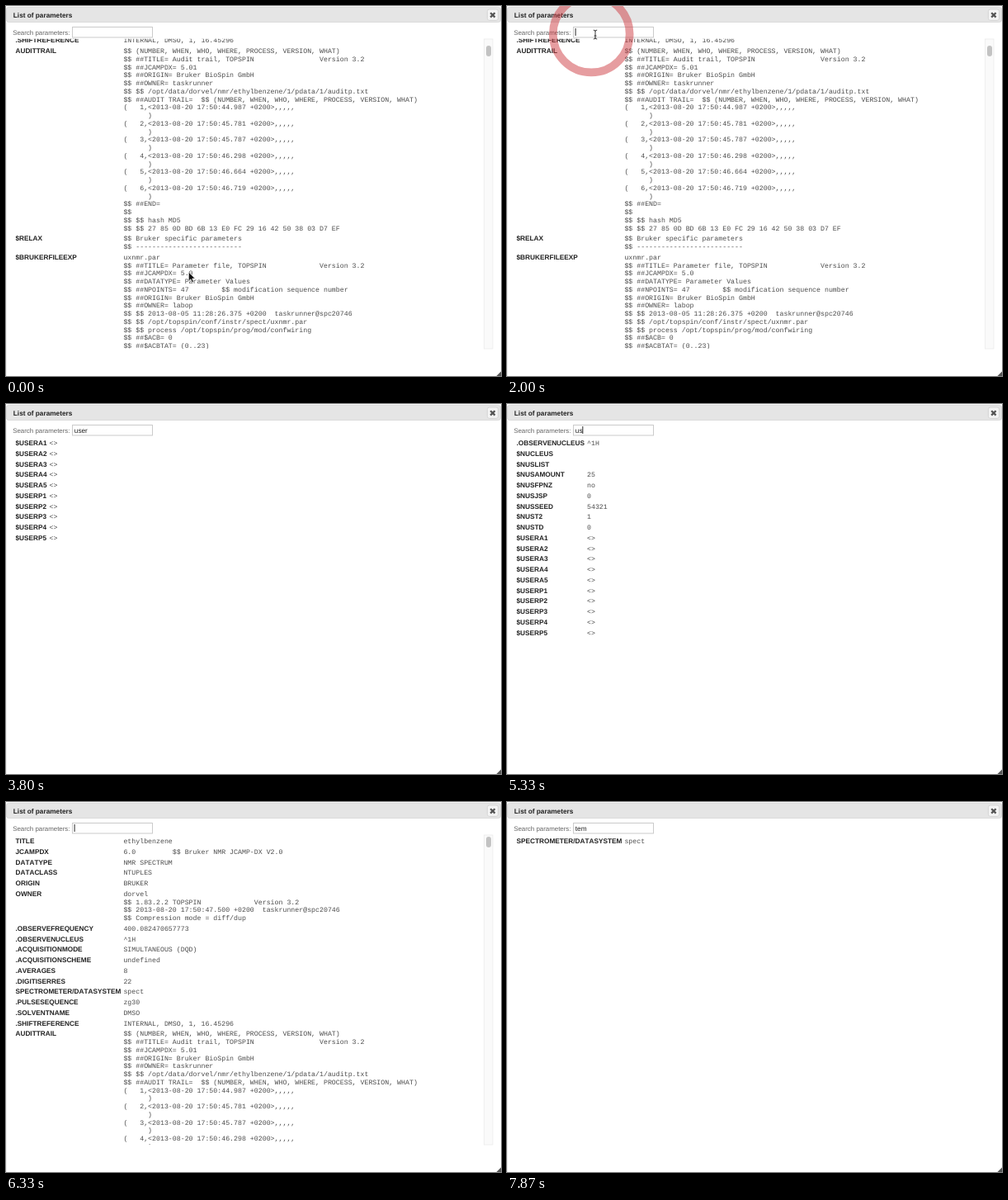
An HTML page that plays this animation: 600x448 px, repeating every 8000 ms.

```html
<!DOCTYPE html>
<html lang="en">
<head>
<meta charset="utf-8">
<title>List of parameters</title>
<style>
html, body { margin: 0; width: 100%; height: 100%; overflow: hidden; background: #fff; }
svg { display: block; }
text { font: 8.25px "Liberation Sans", Arial, sans-serif; font-kerning: none; text-rendering: geometricPrecision; white-space: pre; }
.label { font-weight: bold; fill: #222; }
.value { font-family: "Liberation Mono", "Courier New", monospace; fill: #4c4c4c; }
</style>
</head>
<body>
<svg width="600" height="448" viewBox="0 0 600 448">
  <defs>
    <clipPath id="view"><rect y="39.8" width="600" height="375.2"/></clipPath>
  </defs>
  <rect width="600" height="448" fill="#fff"/>
  <path d="M.5 20V448" stroke="#f0f0f0"/>
  <rect x=".4" y="1.4" width="599.2" height="18.2" rx="3" fill="#e5e5e5" stroke="#d3d3d3" stroke-width=".8"/>
  <text class="label" x="8.8" y="14">List of parameters</text>
  <rect x="583.4" y="4" width="13.2" height="13.4" rx="2.5" fill="#f4f4f4" stroke="#d0d0d0" stroke-width=".8"/>
  <path d="M587.2 8.2l5.4 5.4M592.6 8.2l-5.4 5.4" stroke="#555" stroke-width="2.3"/>
  <path d="M600 442.5V448H594.5Z" fill="#555"/>
  <text x="8.2" y="34.6" fill="#666" style="font-size:7.9px">Search parameters:</text>
  <rect x="80.5" y="25.5" width="97" height="12.5" fill="#fff" stroke="#cbcbcb"/>
  <text id="query" x="82.8" y="34.5" fill="#222"></text>
  <path id="caret" d="M0 27V36" stroke="#111" stroke-width=".9"/>
  <g clip-path="url(#view)"><g id="list"></g></g>
  <g id="scroll">
    <rect x="579.5" y="40" width="10.5" height="375" fill="#fafafa" stroke="#ebebeb" stroke-width=".8"/>
    <rect id="thumb" x="582" width="6" height="13" rx="3"/>
  </g>
  <circle id="ring" cx="102.2" cy="34" fill="none" stroke="#cd3a40"/>
  <path id="arrow" d="M0 0V11.2L2.6 8.8L4.4 12.9L6.2 12.1L4.5 8.1H8Z" fill="#111" stroke="#fff" stroke-width=".7"/>
  <path id="beam" d="M104.8 29.2Q107 29.2 107 30.5Q107 29.2 109.2 29.2M107 30V39.5M104.8 40Q107 40 107 38.7Q107 40 109.2 40M105.6 36H108.4" fill="none" stroke="#222" stroke-width=".9"/>
</svg>
<script>
const $ = id => document.getElementById(id);
const SIZE = 8.25, LINE = 9.75, LEFT = 11.5, LOOP = 8000;
const gap = n => ' '.repeat(n);

const stamps = ['44.987', '45.781', '45.787', '46.298', '46.664', '46.719'];
const audit = `$$ (NUMBER, WHEN, WHO, WHERE, PROCESS, VERSION, WHAT)
$$ ##TITLE= Audit trail, TOPSPIN${gap(16)}Version 3.2
$$ ##JCAMPDX= 5.01
$$ ##ORIGIN= Bruker BioSpin GmbH
$$ ##OWNER= taskrunner
$$ $$ /opt/data/dorvel/nmr/ethylbenzene/1/pdata/1/auditp.txt
$$ ##AUDIT TRAIL=  $$ (NUMBER, WHEN, WHO, WHERE, PROCESS, VERSION, WHAT)
${stamps.map((s, i) => `(   ${i + 1},<2013-08-20 17:50:${s} +0200>,,,,,\n      )`).join('\n')}
$$ ##END=
$$
$$ $$ hash MD5
$$ $$ 27 85 0D BD 6B 13 E0 FC 29 16 42 50 38 03 D7 EF`;

const setup = `uxnmr.par
$$ ##TITLE= Parameter file, TOPSPIN${gap(13)}Version 3.2
$$ ##JCAMPDX= 5.0
$$ ##DATATYPE= Parameter Values
$$ ##NPOINTS= 47${gap(8)}$$ modification sequence number
$$ ##ORIGIN= Bruker BioSpin GmbH
$$ ##OWNER= labop
$$ $$ 2013-08-05 11:28:26.375 +0200  taskrunner@spc20746
$$ $$ /opt/topspin/conf/instr/spect/uxnmr.par
$$ $$ process /opt/topspin/prog/mod/confwiring
$$ ##$ACB= 0
$$ ##$ACBTAT= (0..23)
0 66 66 50${' 0'.repeat(20)}
$$ ##$ACBTBA= (0..23)
0${' 0'.repeat(23)}`;

const owner = `dorvel
$$ 1.83.2.2 TOPSPIN${gap(13)}Version 3.2
$$ 2013-08-20 17:50:47.500 +0200  taskrunner@spc20746
$$ Compression mode = diff/dup`;

// one "label|value" entry per line
const pairs = text => text.split('\n').map(s => s.split('|'));
const rows = [
  ...pairs(`TITLE|ethylbenzene
JCAMPDX|6.0${gap(9)}$$ Bruker NMR JCAMP-DX V2.0
DATATYPE|NMR SPECTRUM
DATACLASS|NTUPLES
ORIGIN|BRUKER`),
  ['OWNER', owner],
  ...pairs(`.OBSERVEFREQUENCY|400.082470657773
.OBSERVENUCLEUS|^1H
.ACQUISITIONMODE|SIMULTANEOUS (DQD)
.ACQUISITIONSCHEME|undefined
.AVERAGES|8
.DIGITISERRES|22
SPECTROMETER/DATASYSTEM|spect
.PULSESEQUENCE|zg30
.SOLVENTNAME|DMSO
.SHIFTREFERENCE|INTERNAL, DMSO, 1, 16.45296`),
  ['AUDITTRAIL', audit],
  ['$RELAX', '$$ Bruker specific parameters\n$$ ' + '-'.repeat(26)],
  ['$BRUKERFILEEXP', setup],
  ...pairs(`$DATE|1377013846
$FILTER|0
$INTEGFAC|1`),
  ['$INTEGRALS', '(0..3)\n0.25 0.25 0.25 0.25'],
  ...pairs(`$ITER|0
$LIMITE|0
$NOTE|<>
$STEP|1
$TE|298.15
$TE1|300
$TE2|300
$TE3|300
$TE4|300
$TEG|300
$NUCLEUS|
$NUSLIST|
$NUSAMOUNT|25
$NUSFPNZ|no
$NUSJSP|0
$NUSSEED|54321
$NUST2|1
$NUSTD|0`),
  ...[...'AP'].flatMap(c => [1, 2, 3, 4, 5].map(n => ['$USER' + c + n, '<>']))
];

// time, typed text, filter, scroll offset
const steps = [
  [0, '', '', 226.2], [3070, 'u', 'u', 56.7], [3130, 'us', 'us', 0],
  [3270, 'use', 'use', 0], [3330, 'user', 'user', 0], [4930, 'use', 'use', 0],
  [5270, 'us', 'use', 0], [5330, 'us', 'us', 0], [5670, 'u', 'u', 0],
  [6130, '', '', 0], [6670, 't', 't', 0], [6870, 'te', 'te', 0], [7400, 'tem', 'tem', 0]
];
// the caret toggles at each of these times, hidden at first
const blinks = [1600, 2130, 2600, 3800, 4330, 4870, 4930, 5870, 6330, 7870];

const pen = document.createElement('canvas').getContext('2d');
function textWidth(s, weight) {
  pen.font = weight + ' 100px "Liberation Sans", Arial, sans-serif';
  pen.fontKerning = 'none';
  return pen.measureText(s).width * SIZE / 100;
}

function addText(cls, x, y, s) {
  const el = document.createElementNS('http://www.w3.org/2000/svg', 'text');
  el.setAttribute('class', cls);
  el.setAttribute('x', x);
  el.setAttribute('y', y);
  el.textContent = s;
  $('list').append(el);
}

function show(id, on) { $(id).style.display = on ? '' : 'none'; }
function set(id, attrs) { for (const k in attrs) $(id).setAttribute(k, attrs[k]); }

function drawList(filter, offset) {
  const found = rows.filter(r => r[0].toLowerCase().includes(filter));
  const col = LEFT + 3 + Math.max(...found.map(r => textWidth(r[0], 'bold')));
  let y = 50 - offset;
  $('list').replaceChildren();
  for (const [label, value] of found) {
    const lines = value.split('\n');
    if (y < 425) {
      addText('label', LEFT, y, label);
      lines.forEach((s, i) => addText('value', col, y + i * LINE, s));
    }
    y += lines.length * LINE + 3;
  }
  show('scroll', y + offset > 425);
  set('thumb', { y: 42 + offset * .0265, fill: offset && filter ? '#c3b4c3' : '#c3c3c3' });
}

const ease = u => { u = Math.min(1, Math.max(0, u)); return u * u * u * (10 - 15 * u + 6 * u * u); };

let current;
function render(t) {
  const step = steps.findLast(s => t >= s[0]);
  const [, typed, filter, offset] = step;
  if (step !== current) {
    current = step;
    $('query').textContent = typed;
    drawList(filter, offset);
    set('caret', { transform: `translate(${83.1 + textWidth(typed, 'normal')})` });
  }
  show('caret', blinks.filter(b => t >= b).length % 2);

  // pointer and click ring advance 15 times a second
  const tick = Math.floor((t + 4) * .015), q = tick / .015;
  const x = 221.3 - 120.6 * ease((q - 140) / 860);
  const y = 322 - 290 * ease((q - 140) / 1060);
  set('arrow', { transform: `translate(${x} ${y})` });
  show('arrow', t < 1800);
  show('beam', t >= 1800 && t < 3070);

  const k = tick - 23;
  show('ring', k >= 0 && k < 9);
  if (k >= 0 && k < 9) {
    const outer = 5.5 + 45.8 * (k / 7) ** 1.6;
    const band = Math.min(outer, 5.5 + .6 * k);
    set('ring', { r: outer - band / 2, 'stroke-width': band, opacity: .88 - .055 * k });
  }
}

const start = performance.now();
function frame() {
  render((performance.now() - start) % LOOP);
  requestAnimationFrame(frame);
}
frame();
</script>
</body>
</html>
```
